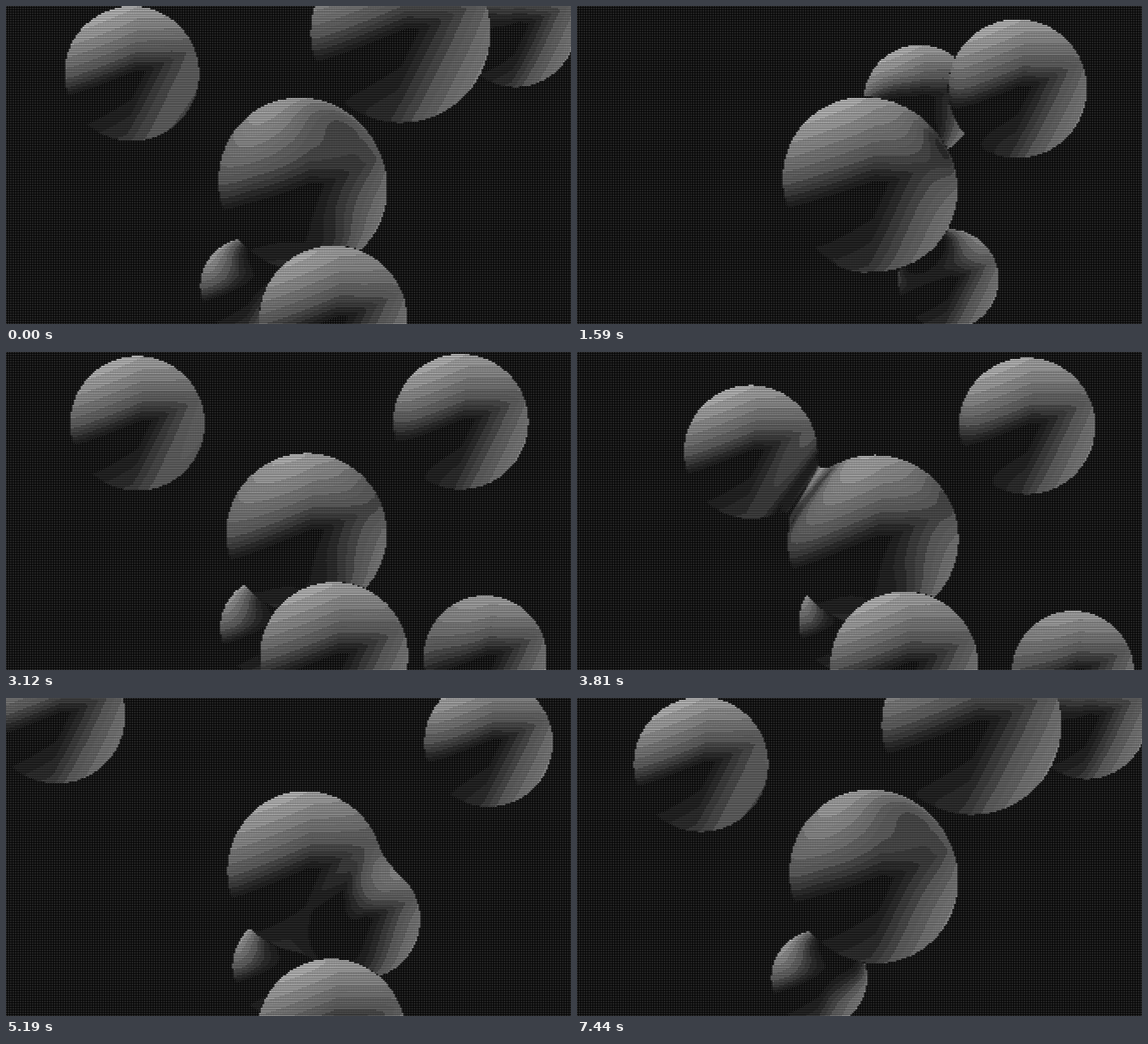
Write an HTML page with a canvas that moves like this. It is 998 px wide and 561 px high and loops after 7470 ms.

```html
<!DOCTYPE html>
<html lang="en">
<head>
<meta charset="utf-8">
<title>Blobs</title>
<style>
  html, body { margin: 0; width: 100%; height: 100%; overflow: hidden; background: #000; }
  canvas { display: block; width: 100%; height: 100%; }
</style>
</head>
<body>
<canvas id="stage" width="998" height="561"></canvas>
<script>
const W = 998, H = 561, LOOP = 7470, STEP = 3, BLEND = 36, LEVELS = 18;
const ctx = document.getElementById('stage').getContext('2d');
const image = ctx.createImageData(W, H);
const pixels = new Uint32Array(image.data.buffer);

const clamp = (v, lo = 0, hi = 1) => Math.min(hi, Math.max(lo, v));
const mix = (a, b, s) => a.map((v, i) => v + (b[i] - v) * s);

// Every ball travels between a few stops (x, y, depth, radius).
// A visit names the stop reached at each beat; fractions lie between two stops.
const beats = [0, 1590, 2460, 3810, 5190, 6270, 7440];
function route(stops, visits) {
  return visits.map(v => {
    const i = clamp(Math.floor(v), 0, stops.length - 2);
    return mix(stops[i], stops[i + 1], v - i);
  });
}
const routes = [
  // core and the bulge moving inside it
  route([[530, 326, 0, 141], [529, 320, 0, 124]], [0, 0, 1, 0, 1, 0, 0]),
  route([[515, 338, 0, 138], [504, 301, 0, 139], [545, 293, 0, 127]], [1.3, 1, 2, 0, 1.6, 0, 1.3]),
  // upper left
  route([[345, 185, 140, 126], [307, 176, 0, 117], [90, 30, 60, 120]], [1.39, 3, 1.97, 1, 2, 0, 1.405]),
  // top, swinging from the front to the back
  route([[530, 318, 0, 60], [718, 130, 100, 114], [697, 47, 220, 158], [605, 167, -190, 98]],
    [2, 3, 0, 0, 0, 1, 2]),
  // upper right
  route([[760, 162, 100, 124], [900, 35, -40, 107]], [1, 0.13, 0.38, 0.25, 0.66, 0, 1]),
  // lower left, behind the core
  route([[500, 395, -70, 70], [428, 494, -170, 84], [490, 473, -190, 89]], [1, 0, 1.55, 1.85, 2, 0, 1]),
  // bottom, in front of the core
  route([[578, 553, 250, 130], [560, 740, 250, 130]], [0, 1, 0, 0, 0.2, 1, 1]),
  // lower right
  route([[627, 391, 20, 104], [876, 564, 0, 107], [656, 482, -150, 88], [726, 478, -80, 96]],
    [-0.35, 2, 0.57, 1, 0, 3, -0.35])
];

// Cubic interpolation through the beats, at rest at both ends.
function ballAt(poses, time) {
  const last = beats.length - 1;
  let i = 0;
  while (i < last - 1 && time >= beats[i + 1]) i++;
  const span = beats[i + 1] - beats[i], s = clamp((time - beats[i]) / span);
  const slope = (k, c) => k === 0 || k === last ? 0
    : (poses[k + 1][c] - poses[k - 1][c]) / (beats[k + 1] - beats[k - 1]);
  const [x, y, z, r] = poses[i].map((v, c) => {
    const m = slope(i, c) * span, n = slope(i + 1, c) * span, d = poses[i + 1][c] - v;
    return v + s * (m + s * (3 * d - 2 * m - n + s * (m + n - 2 * d)));
  });
  return { x, y, z, r };
}

// A glyph is a cell of 3 by 6 pixels.
const gray = v => (0xff000000 | Math.round(clamp(v, 0, 255)) * 0x010101) >>> 0;
function makeGlyph(shade) {
  return Uint32Array.from({ length: 18 }, (_, i) => gray(shade(i % 3, Math.floor(i / 3))));
}
const dots = strength => makeGlyph((x, y) => x === 1 && y % 3 === 1 ? strength : 0);
const backdrop = dots(190);
const stripes = [0.45, 1, 0.8, 0.35, 1, 0.7];
const glyphs = Array.from({ length: LEVELS + 1 }, (_, level) => {
  if (level < 2) return dots(190);
  const tone = 40 + 235 * level / LEVELS;
  const gap = clamp(level / 6, 0.3, 1);
  return makeGlyph((x, y) => {
    const notch = level % 2 && x === 1 ? 0.85 : 1;
    return tone * stripes[y] * notch * (y % 3 === 1 ? 1 : gap);
  });
});

function distance(balls, x, y, z) {
  let result = 1e4;
  for (const b of balls) {
    const dx = x - b.x, dy = y - b.y, dz = z - b.z;
    const d = Math.sqrt(dx * dx + dy * dy + dz * dz) - b.r;
    const h = Math.max(BLEND - Math.abs(d - result), 0);
    result = Math.min(d, result) - h * h / (4 * BLEND);
  }
  return result;
}

function findSurface(near, x, y) {
  let z = -1e4, back = 1e4;
  for (const b of near) {
    const d2 = (x - b.x) ** 2 + (y - b.y) ** 2;
    z = Math.max(z, b.z + Math.sqrt(Math.max(b.r * b.r - d2, 0)) + 20);
    back = Math.min(back, b.z - b.r);
  }
  for (let i = 0; i < 40 && z > back; i++) {
    const d = distance(near, x, y, z);
    if (d < 0.6) return z;
    z -= d;
  }
  return null;
}

// Light left over after neighbouring balls block part of the view.
function openness(balls, p, n) {
  let light = 1;
  for (const b of balls) {
    const dx = b.x - p[0], dy = b.y - p[1], dz = b.z - p[2];
    const d = Math.hypot(dx, dy, dz);
    const facing = (dx * n[0] + dy * n[1] + dz * n[2]) / d;
    if (facing <= 0) continue;
    const apart = clamp((d - b.r) / 30);
    light *= 1 - clamp(2.5 * facing * apart * (b.r / d) ** 4);
  }
  return light;
}

const lights = [
  { dir: [-0.38, -0.92, 0.05], power: 0.8 },
  { dir: [0.98, 0.1, -0.05], power: 0.33 },
  { dir: [0.55, 0.83, -0.08], power: 0.22 }
];
function brightness(balls, near, x, y, z) {
  const d = distance(near, x, y, z);
  const g = [distance(near, x + 1, y, z) - d, distance(near, x, y + 1, z) - d, distance(near, x, y, z + 1) - d];
  const size = Math.hypot(...g) || 1;
  const n = g.map(v => v / size);
  let sum = 0;
  for (const { dir, power } of lights) {
    sum += power * Math.max(0, n[0] * dir[0] + n[1] * dir[1] + n[2] * dir[2]);
  }
  return sum ** 0.85 * openness(balls, [x, y, z], n);
}

function stamp(glyph, x, y) {
  const right = Math.min(x + STEP, W), low = Math.min(y + STEP, H);
  for (let py = y; py < low; py++) {
    for (let px = x; px < right; px++) {
      pixels[py * W + px] = glyph[(py % 6) * 3 + px % 3];
    }
  }
}

function draw(time) {
  const balls = routes.map(poses => ballAt(poses, time));
  for (let y = 0; y < H; y += STEP) {
    const cy = y + 1.5;
    const inRow = balls.filter(b => Math.abs(cy - b.y) < b.r + BLEND);
    for (let x = 0; x < W; x += STEP) {
      const cx = x + 1.5;
      const near = inRow.filter(b => (cx - b.x) ** 2 + (cy - b.y) ** 2 < (b.r + BLEND) ** 2);
      const z = near.length ? findSurface(near, cx, cy) : null;
      let glyph = backdrop;
      if (z !== null) {
        const level = Math.round(brightness(balls, near, cx, cy, z) * LEVELS);
        glyph = glyphs[clamp(level, 0, LEVELS)];
      }
      stamp(glyph, x, y);
    }
  }
  ctx.putImageData(image, 0, 0);
}

const start = performance.now();
let shown = -1;
function tick() {
  const time = Math.floor(((performance.now() - start) % LOOP) / 30) * 30;
  if (time !== shown) draw(shown = time);
  requestAnimationFrame(tick);
}
tick();
</script>
</body>
</html>
```
